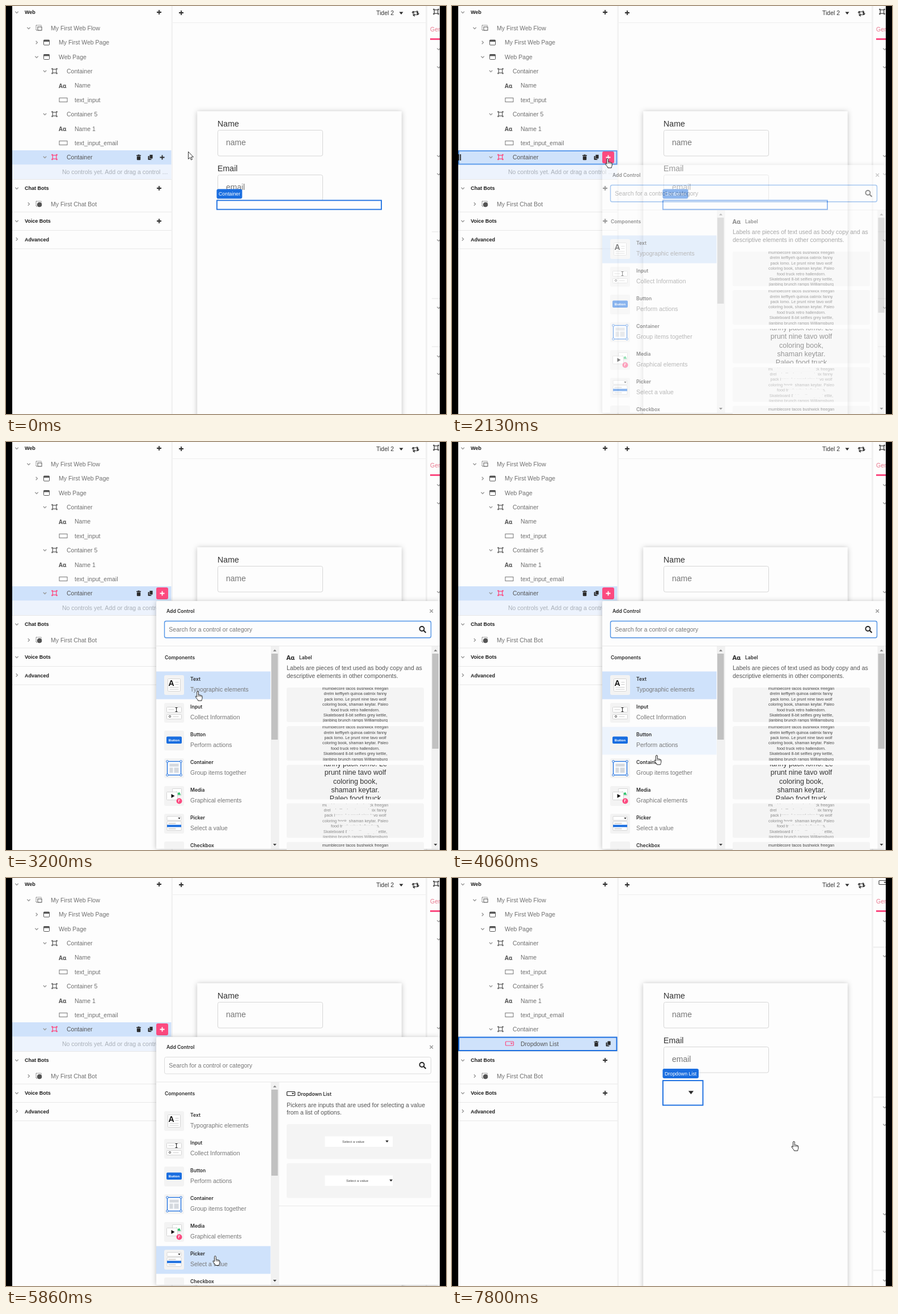
An HTML page for the animation above (8000 ms loop, 776 by 721 pixels).

```html
<!DOCTYPE html>
<html lang="en">
<head>
<meta charset="utf-8">
<title>Add control</title>
<style>
html, body { margin: 0; width: 100%; height: 100%; overflow: hidden; background: #000; }
svg { display: block; width: 776px; height: 721px; font-family: "Liberation Sans", Arial, sans-serif; }
.h { font-family: Inter, sans-serif; font-weight: 600; }
.aa { font-family: "Noto Sans", sans-serif; font-weight: 800; }
</style>
</head>
<body>
<svg id="stage" viewBox="0 0 776 721"></svg>
<script>
const LOOP = 8000, BLUE = '#1a6ee0', PINK = '#fc4a80', PAPER = '#fdfdfd', INK = '#2b2b2b', GREY = '#6f6f6f';

const text = (x, y, s, fill = GREY, size = 10.5, more = '') =>
  `<text x="${x}" y="${y}" fill="${fill}" font-size="${size}" ${more}>${s}</text>`;
const bold = (x, y, s) => text(x, y, s, '#1d1d1d', 9, 'font-weight="700"');
const head = (x, y, s) => text(x, y, s, INK, 8.6, 'class="h"');
const rect = (x, y, w, h, fill, more = '') =>
  `<rect x="${x}" y="${y}" width="${w}" height="${h}" fill="${fill}" ${more}/>`;
const path = (d, stroke, w = 1.4, fill = 'none', more = '') =>
  `<path d="${d}" stroke="${stroke}" stroke-width="${w}" fill="${fill}" ${more}/>`;
const at = (x, y, s) => `<g transform="translate(${x} ${y})">${s}</g>`;
const group = (id, s, more = '') => `<g id="${id}" ${more}>${s}</g>`;
const down = (x, y) => path(`M${x - 2.7} ${y - 1.3}l2.7 2.7 2.7-2.7`, '#999', 1.4);
const right = (x, y) => path(`M${x - 1.3} ${y - 2.7}l2.7 2.7-2.7 2.7`, '#999', 1.4);
const plus = (x, y, c = INK) => path(`M${x - 4} ${y}h8M${x} ${y - 4}v8`, c, 1.8);
const tri = (x, y, r, c = INK) => path(`M${x - r} ${y - r * .6}h${2 * r}l${-r} ${r * 1.3}z`, 'none', 0, c);
const hline = (x, y, w, c = '#e8e8e8') => rect(x, y, w, 1, c);
const box = (x, y, c = '#666') => at(x, y, rect(-3.2, -3.2, 6.4, 6.4, 'none', `stroke="${c}" stroke-width="1.3"`) +
  [[-4, -4], [4, -4], [-4, 4], [4, 4]].map(([a, b]) => rect(a - 1.2, b - 1.2, 2.4, 2.4, c)).join(''));
const page = (x, y) => rect(x - 5, y - 4.5, 10, 9, 'none', 'rx="1" stroke="#555"') + rect(x - 5, y - 4.5, 10, 3, '#555');
const field = (x, y) => rect(x - 7, y - 3.5, 14, 7, 'none', 'stroke="#777"');
const picker = (x, y, c) => rect(x - 7, y - 3.5, 14, 7, 'none', `rx="1" stroke="${c}" stroke-width="1.2"`) + tri(x + 3.5, y, 2.2, c);
const aa = (x, y, c, size = 10) => text(x, y, 'Aɑ', c, size, 'class="aa"');
const trash = (x, y) => rect(x - 4, y - 4, 8, 1.5, INK) + rect(x - 1.5, y - 5, 3, 1.5, INK) + rect(x - 3.2, y - 1.9, 6.4, 6.6, INK, 'rx="1"');
const copy = (x, y) => rect(x - 4, y - 2.5, 6, 7, INK, 'rx="1"') + rect(x - 1.5, y - 5, 6, 7.5, INK, `rx="1" stroke="#cfe2fb" stroke-width=".8"`);
const tag = (y, w, s) => rect(371.5, y, w, 17, BLUE, 'rx="3"') + text(375, y + 11.6, s, '#fff', 8.8);

function tree() {
  const dashed = (y) => rect(53, y - 5, 9, 9, 'none', 'stroke="#555" stroke-dasharray="1.6 1.2"');
  const heads = [[11, 'Web'], [322, 'Chat Bots'], [380, 'Voice Bots']];
  const rows = [[39, 79, 'My First Web Flow'], [64.5, 93, 'My First Web Page'], [90, 93, 'Web Page'], [115, 107, 'Container'],
    [140.5, 121, 'Name'], [166, 121, 'text_input'], [191, 107, 'Container 5'], [217, 121, 'Name 1'],
    [242, 121, 'text_input_email'], [350, 79, 'My First Chat Bot']];
  return heads.map(([y, s]) => down(19, y) + bold(33, y + 3.4, s) + plus(270, y)).join('') +
    right(19, 412) + bold(33, 415.6, 'Advanced') +
    rows.map(([y, x, s]) => text(x, y + 3.8, s)).join('') +
    [306, 363.5, 396, 428.5].map(y => hline(11, y, 281)).join('') +
    down(40, 39) + dashed(39) + rect(56, 37, 7, 6, PAPER, 'stroke="#555"') +
    right(54, 64.5) + page(71.5, 64.5) + down(54, 90) + page(71.5, 90) +
    [115, 191].map(y => down(68.5, y) + box(85.5, y)).join('') +
    aa(93, 144.5, '#555') + aa(93, 221, '#555') + field(101, 166) + field(101, 242) +
    right(40, 350) + dashed(350) + '<circle cx="59" cy="351" r="4.3" fill="#555"/>';
}

function chrome() {
  const input = (y, label, hint) => text(373, y, label, '#333', 14.2) +
    rect(373.5, y + 6.5, 185, 45.5, PAPER, 'rx="3" stroke="#d6d6d6"') + text(388, y + 32.5, hint, '#777', 14);
  return rect(11, 0, 754, 721, PAPER) + rect(291.5, 0, 2.5, 721, '#f1f1f1') + rect(740, 0, 3, 721, '#f1f1f1') +
    hline(294, 29, 446, '#eeeeee') + plus(309, 12) + text(653, 16, 'Tidel 2', '#333') + tri(697, 12.5, 3.5) +
    path('M718 14.5v-4.5h8M725 8v4l2-2M726.5 10.5v5h-8M720 13.2v4.5l-2.4-2.2M716 12l2-2.5 2 2.5M724.5 12.8l2 2.5 2-2.5', INK, 1.2) +
    rect(337.5, 186, 360, 560, PAPER, 'filter="url(#soft)"') +
    input(213, 'Name', 'name') + input(292, 'Email', 'email') +
    text(748, 45, 'General', '#e8798f', 10.5) + rect(748, 57, 20, 3, PINK) + down(763, 76);
}

const before = () =>
  rect(11, 255, 280.5, 25.5, '#cfe2fb') + rect(11, 280.5, 280.5, 25.5, '#edf3fd') +
  down(68.5, 267) + box(85.5, 267, PINK) + text(107, 271, 'Container', '#555') + trash(234, 267.5) + copy(254.5, 267.5) +
  text(99, 297, 'No controls yet. Add or drag a control …', '#a9b0b8') +
  group('focus', rect(12, 256, 278.5, 23.5, 'none', 'stroke="#5f9dec" stroke-width="2"') +
    rect(11, 262, 1.8, 11, INK) + rect(14, 262, 1.8, 11, INK)) +
  rect(265, 257, 21, 21, 'none', 'id="btn" rx="3"') + group('btnPlus', path('M271.5 267.5h8M275.5 263.5v8', 'inherit', 1.8).replace('stroke="inherit"', '')) +
  rect(372, 343.5, 290, 16, PAPER, `stroke="${BLUE}" stroke-width="1.8"`) + tag(323.5, 45, 'Container') +
  box(758.5, 10, '#444') + [108, 265, 297, 414, 533, 619, 650].map(y => down(763, y)).join('') +
  [398, 516, 601].map(y => rect(751, y, 15, 2, '#f0f0f0')).join('');

const after = () =>
  down(68.5, 267) + box(85.5, 267) + text(107, 271, 'Container') +
  rect(12, 281.5, 278.5, 23.5, '#cfe2fb', `stroke="${BLUE}" stroke-width="2"`) +
  picker(101.5, 292.5, PINK) + text(121, 296.5, 'Dropdown List', '#555') + trash(254.5, 293) + copy(275.5, 293) +
  rect(372, 358, 70.5, 43.5, PAPER, `stroke="${BLUE}" stroke-width="1.9"`) + tri(421.5, 379, 4.6) + tag(337, 63.5, 'Dropdown List') +
  picker(760, 8, '#444') + [138, 405, 436, 594, 625, 711].map(y => down(763, y)).join('') +
  [121, 386, 692].map(y => rect(743, y, 23, 2.5, '#f0f0f0')).join('');

const ROW = 49, TOP = 405.5;
const white = (x, y, w, h) => rect(x, y, w, h, '#fff', 'rx="1" stroke="#ccc" stroke-width=".8"');
const icons = [
  white(-11, -11, 22, 22) + text(-10, 1, 'A', '#111', 14, 'font-weight="700"') + path('M2-5h6M2-1h6M-8 4h16M-8 7.5h16', '#ccc', 1.2),
  white(-13, -10, 26, 9) + white(-13, 3, 26, 8) + path('M-10-5.5h10M-2 7h10', '#ccc', 1.2) + path('M2-9h4M4-9v7M2-2h4', '#222', 1) +
    '<circle cx="-7.5" cy="6.5" r="1.6" fill="none" stroke="#555"/>',
  rect(-13.5, -7, 27, 12.5, BLUE, 'rx="2"') + text(0, 1.5, 'Button', '#fff', 6, 'text-anchor="middle" font-weight="700"'),
  rect(-12, -12, 24, 24, '#fafcff', `stroke="${BLUE}" stroke-width="1.3"`) + rect(-8, -8, 16, 5, '#d5d9de') + rect(-8, -1, 6, 9, '#d5d9de') + rect(0, -1, 8, 9, '#d5d9de') +
    [[-12, -12], [12, -12], [-12, 12], [12, 12]].map(([x, y]) => `<circle cx="${x}" cy="${y}" r="1.8" fill="#fff" stroke="${BLUE}"/>`).join(''),
  white(-3, -13, 16, 12) + path('M-1-2l5-6 3 3 2-2 3 5z', 'none', 0, '#2fc46d') + white(-13, -7, 19, 14) + path('M-5-3.5v7l6-3.5z', 'none', 0, '#111') +
    `<circle cx="9" cy="9" r="5" fill="${PINK}"/>` + path('M8 11v-4.5l2.5 1', '#fff', 1),
  white(-12.5, -13, 25, 7) + tri(9, -9.5, 2.2) + white(-12.5, -4, 25, 16) + rect(-12.5, 2, 25, 4, BLUE) + path('M-10-.5h13M-10 9h13', '#ccc', 1.4),
  rect(-12, -4, 12, 12, '#ddd') + rect(2, 0, 10, 6, '#d2d2d2')
];
const items = [['Text', 'Typographic elements'], ['Input', 'Collect Information'], ['Button', 'Perform actions'],
  ['Container', 'Group items together'], ['Media', 'Graphical elements'], ['Picker', 'Select a value'], ['Checkbox', '']];

const scroll = (x, end) => rect(x, 361, 13.5, 358, '#f1f1f1') + rect(x + 1, 374, 11.5, end - 374, '#c1c1c1') +
  path(`M${x + 4} 370h6l-3-3.6z`, 'none', 0, '#888') + path(`M${x + 4} 710h6l-3 3.6z`, 'none', 0, '#444');

const copyLines = ['mumblecore tacos bushwick freegan', 'drelm keffiyeh quinoa oatmix fanny', 'pack lomo. Le prunt nine tavo wolf',
  'coloring book, shaman keytar. Paleo', 'food truck retro hallendorn.', 'Skateboard 8-bit selfies grey kettle,', 'jianbing brunch ramps Williamsburg'];
const bigLines = ['fanny pack lomo. Le', 'prunt nine tavo wolf', 'coloring book,', 'shaman keytar.', 'Paleo food truck'];

function samples() {
  const block = (lines, y, step, size, fill) => lines.map((s, i) =>
    text(616, y + i * step, s, fill, size, 'text-anchor="middle"')).join('');
  const gaps = y => [0, 1, 2, 4, 5].map(i => rect(566 + i * 7, y + i * 9.4 - 3, 76 - i * 4, 6, '#f4f4f4')).join('') + rect(583, y + 28, 22, 5, '#f4f4f4');
  const body = [y => block(copyLines, y + 3.9, 9.4, 7.2, '#444'), y => block(copyLines, y + 3.9, 9.4, 7.2, '#444'),
    y => block(bigLines, y + 2.4, 15.4, 12.5, '#333'), y => block(copyLines, y + 5, 9.4, 7.2, '#8a8a8a') + gaps(y + 4),
    y => block(copyLines, y + 8.5, 9.4, 7.2, '#444')];
  return body.map((draw, i) => {
    const y = 434 + i * 68.2;
    return rect(495, y, 242, 61, '#f4f4f4', 'rx="3"') +
      `<clipPath id="card${i}">${rect(495, y, 242, Math.min(61, 718 - y), '#000')}</clipPath><g clip-path="url(#card${i})">${draw(y)}</g>`;
  }).join('');
}

function popup() {
  const list = items.map(([name, info], i) => {
    const y = TOP + i * ROW;
    return rect(279, y + 6.5, 35, 35, '#f3f3f3', 'rx="3"') + at(296.5, y + 24, icons[i]) +
      head(i ? 325 : 325, y + 16.3, name) + text(325, y + 35.3, info, '#777');
  }).join('');
  const choice = (id, y, x, tx) => rect(495, y, 255, 61.5, '#f4f4f4', `id="${id}" rx="3"`) +
    rect(562.5, y + 21.5, 119.5, 18.5, '#fff') + text(x, y + 33, 'Select a value', '#444', 6.2) + tri(tx, y + 30.5, 2.8);
  const labelPane = aa(494.5, 385, '#222', 11) + head(517, 384, 'Label') +
    text(495, 403, 'Labels are pieces of text used as body copy and as', '#555') +
    text(495, 417, 'descriptive elements in other components.', '#555') + samples() + scroll(750.5, 542);
  const pickPane = picker(502.5, 381, '#222') + head(514, 384.8, 'Dropdown List') +
    text(495, 404.6, 'Pickers are inputs that are used for selecting a value', '#555') +
    text(495, 418.4, 'from a list of options.', '#555') +
    choice('c0', 435, 593, 672) + choice('c1', 504, 600, 679) + hline(481, 579, 284);
  return rect(265, 281, 500, 438, PAPER, 'rx="3" filter="url(#soft)"') +
    head(283, 301.8, 'Add Control') + path('M747.5 296l5.5 5.5M753 296l-5.5 5.5', '#999', 1.5) +
    rect(279.5, 316.5, 470, 29.5, PAPER, 'rx="3" stroke="#dcdcdc"') +
    rect(279.5, 316.5, 470, 29.5, 'none', 'id="ring" rx="3" stroke="#4f93e6" stroke-width="1.4"') +
    text(287.3, 334.8, 'Search for a control or category', '#777') + rect(287.5, 325, 1, 12, '#222', 'id="caret"') +
    '<circle cx="733.5" cy="330" r="4" fill="none" stroke="#222" stroke-width="1.9"/>' + path('M736.5 333l4 4', '#222', 2.2) +
    hline(265, 360, 500) + head(280, 384.3, 'Components') +
    `<g clip-path="url(#list)">${rect(265, 0, 201.5, ROW, '#cfe2fb', 'id="sel"')}${rect(265, 0, 201.5, ROW, '#edf4fd', 'id="hover"')}${list}</g>` +
    scroll(467, 526) + rect(480.5, 361, 1, 358, '#ececec') + group('labelPane', labelPane) + group('pickPane', pickPane);
}

const hand = path('M-1.5 10V1.4a1.4 1.4 0 0 1 2.8 0V6.4q1.3-.9 2.4.4q1.4-.7 2.2.6q1.8-.3 1.9 1.4V11.5c0 2-1 2.7-1.1 5H.4C.2 14-3 12.4-4 9.6c-.4-1.5 1.2-1.7 2.5.4z', '#222', 1, '#fff') +
  path('M1.3 6.5v3M3.7 7v2.7M5.9 7.6v2.4', '#222', .8);
const arrow = path('M.5.5v13l3-2.8 2 4.3 2-.9-2-4.2h4z', '#333', 1, '#fff');

document.getElementById('stage').innerHTML =
  `<defs><filter id="soft" x="-20%" y="-20%" width="140%" height="140%"><feDropShadow dx="0" dy="1" stdDeviation="5" flood-color="#000" flood-opacity=".25"/></filter>
  <clipPath id="list">${rect(265, 361, 202, 357.5, '#000')}</clipPath><clipPath id="view">${rect(11, 0, 754, 721, '#000')}</clipPath></defs>` +
  rect(0, 0, 776, 721, '#000') +
  `<g clip-path="url(#view)">${chrome() + tree() + group('before', before()) + group('after', after()) + group('popup', popup())}
  ${group('cursor', group('hand', hand) + group('arrow', arrow))}</g>`;

const $ = {};
document.querySelectorAll('[id]').forEach(el => $[el.id] = el);
const set = (id, name, v) => $[id].setAttribute(name, v);
const show = (id, on) => set(id, 'visibility', on ? 'inherit' : 'hidden');
const ramp = (t, a, b) => Math.min(1, Math.max(0, (t - a) / (b - a)));
const ease = k => k * k * (3 - 2 * k);

// start, end, then bezier points (two for a straight move, four for a curve)
const moves = [
  [660, 1330, [321, 257], [274.5, 269.5]],
  [2600, 3400, [274.5, 269.5], [350, 472]],
  [3600, 4400, [350, 472], [368, 605]],
  [4460, 4860, [368, 605], [368, 667]],
  [5060, 5061, [368, 667], [369, 668]],
  [5860, 6660, [369, 668], [520, 710], [830, 640], [603, 465.5]]
];
function pointer(t) {
  const [a, b, ...pts] = moves.filter(m => m[0] <= t).pop() || moves[0];
  const k = ease(ramp(t, a, b));
  let p = pts;
  while (p.length > 1) p = p.slice(1).map((q, i) => [0, 1].map(j => p[i][j] + (q[j] - p[i][j]) * k));
  return p[0];
}

function draw(t) {
  const [x, y] = pointer(t), [hx, hy] = pointer(t - 60);
  const done = t >= 7700, open = t >= 2060;
  const selected = t < 5200 ? 0 : 5;
  const inTree = x < 291 && y < 281;
  const row = hx > 265 && hx < 467 && hy >= TOP ? Math.floor((hy - TOP) / ROW) : -1;
  const onCard = top => t > 5400 && hx > 495 && hx < 750 && hy > top && hy < top + 61.5;

  show('before', !done);
  show('after', done);
  show('focus', inTree);
  const onBtn = x < 286 && inTree;
  set('btn', 'fill', open ? PINK : t >= 1860 ? '#fbb5cb' : onBtn ? '#fcd3e0' : 'none');
  set('btnPlus', 'stroke', open ? '#fff' : onBtn ? '#e0245e' : INK);

  set('popup', 'opacity', ramp(t, 2030, 2230) * (1 - ramp(t, 7530, 7730)));
  set('ring', 'opacity', 1 - ramp(t, 5200, 5400));
  show('caret', t >= 2200 && t < 5200 && Math.floor((t - 2200) / 530) % 2 === 0);
  set('sel', 'y', TOP + selected * ROW);
  set('hover', 'y', TOP + row * ROW);
  show('hover', row >= 0 && row !== selected);
  show('labelPane', t < 5300);
  show('pickPane', t >= 5300);
  set('c0', 'fill', onCard(435) ? '#edf4fd' : '#f4f4f4');
  set('c1', 'fill', onCard(504) ? '#edf4fd' : '#f4f4f4');

  const pointing = inTree || row >= 0 || onCard(435) || onCard(504) || done;
  show('hand', pointing);
  show('arrow', !pointing);
  set('cursor', 'transform', `translate(${x} ${y})`);
}

const begin = performance.now();
function tick() {
  draw((performance.now() - begin) % LOOP);
  requestAnimationFrame(tick);
}
tick();
</script>
</body>
</html>
```
